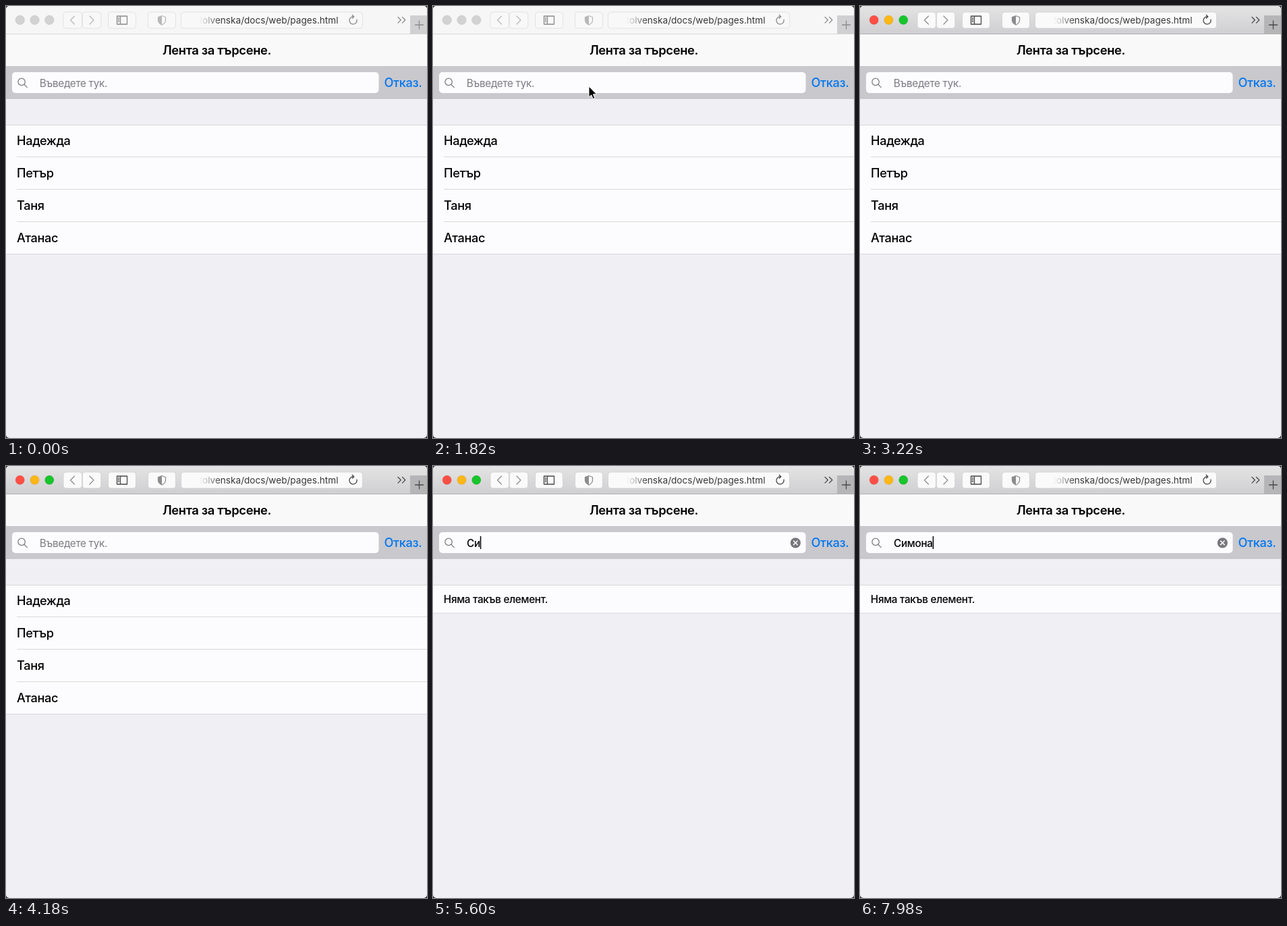
Animation of 624x640 px, one loop 8000 ms. Source, as an HTML page:

```html
<!DOCTYPE html>
<html lang="bg">
<head>
<meta charset="utf-8">
<title>Лента за търсене</title>
<style>
html, body { margin: 0; width: 100%; height: 100%; overflow: hidden; background: #343230; }
svg { display: block; width: 624px; height: 640px; }
text { font-family: Inter, "Noto Sans", sans-serif; font-size: 18.2px; font-weight: 450; letter-spacing: -.02em; fill: #000; white-space: pre; }
.title { font-size: 18.4px; font-weight: 600; text-anchor: middle; }
.small { font-size: 15.3px; }
.hint { font-weight: 400; fill: #7c7c80; }
.link { fill: #0076f0; }
.address { font-size: 13.6px; font-weight: 400; letter-spacing: 0; text-anchor: end; fill: #38383a; }
.icon { fill: none; stroke: #48484a; stroke-width: 1.3; stroke-linecap: round; stroke-linejoin: round; }
.faint { stroke: #8c8c8e; }
.search { stroke: #7e7e82; }
.button { fill: #fafafa; stroke: #cdcdce; stroke-width: .8; }
.edge { stroke: #d9d8dc; }
.lights circle { stroke: #0002; stroke-width: .6; }
.inactive .bar { fill: #f6f6f6; }
.inactive .button { fill: #f8f8f8; stroke: #dcdcdc; }
.inactive .icon { stroke: #8b8b8d; }
.inactive .faint { stroke: #b8b8ba; }
.inactive .half { fill: #b8b8ba; }
.inactive .lights circle { fill: #d2d2d3; stroke: #c3c3c4; }
.inactive .rule { stroke: #d8d8d9; }
.half { fill: #8c8c8e; }
.rule { stroke: #b2b2b4; }
</style>
</head>
<body>
<svg viewBox="0 0 624 640">
  <defs>
    <linearGradient id="metal" x2="0" y2="1">
      <stop stop-color="#e5e4e5"/><stop offset="1" stop-color="#cfced0"/>
    </linearGradient>
    <linearGradient id="fade" gradientUnits="userSpaceOnUse" x1="287" x2="318">
      <stop stop-color="#fff" stop-opacity="0"/><stop offset="1" stop-color="#fff"/>
    </linearGradient>
    <mask id="fadeMask"><rect x="287" y="8" width="210" height="28" fill="url(#fade)"/></mask>
    <clipPath id="window"><rect width="624" height="640" rx="5"/></clipPath>
  </defs>
  <rect width="624" height="640" fill="#343230"/>
  <g clip-path="url(#window)">
    <rect width="624" height="640" fill="#efeff4"/>

    <g id="chrome">
      <rect class="bar" width="624" height="41" fill="url(#metal)"/>
      <g class="lights">
        <circle cx="20.7" cy="20.7" r="6.7" fill="#ff4f44"/>
        <circle cx="42.5" cy="20.7" r="6.7" fill="#ffb714"/>
        <circle cx="64.3" cy="20.7" r="6.7" fill="#17c52c"/>
      </g>
      <rect class="button" x="85" y="9" width="27.5" height="24" rx="4"/>
      <rect class="button" x="113.3" y="9" width="27.5" height="24" rx="4"/>
      <rect class="button" x="151.5" y="9" width="41" height="24" rx="4"/>
      <rect class="button" x="210.5" y="9" width="41" height="24" rx="4"/>
      <rect class="button" x="259.5" y="9" width="269" height="24" rx="4"/>
      <path class="icon faint" d="M101.5 15l-6 6 6 6M124 15l6 6-6 6"/>
      <path class="icon" d="M164.5 15h15v12h-15zM169.5 15v12M166.300 18h1.4M166.300 20.5h1.4M166.300 23h1.4"/>
      <path class="icon faint" d="M231 14.5l5.5 2v4.5q0 4.5-5.5 7-5.5-2.5-5.5-7v-4.5z"/>
      <path class="half" d="M231 14.5v13.5q-5.5-2.5-5.5-7v-4.5z"/>
      <path class="icon" d="M520 20.2a5.6 5.6 0 1 1-4.8-4.4M513.2 13.2l2.6 2.6-2.6 2.6"/>
      <path class="icon" d="M581 16.5l4.3 4.3-4.3 4.3M587.5 16.5l4.3 4.3-4.3 4.3"/>
      <g mask="url(#fadeMask)"><text class="address" x="492.5" y="26.3">tolvenska/docs/web/pages.html</text></g>
      <path class="rule" d="M0 41.5H624"/>
      <rect id="newTab" x="599" y="14" width="25" height="27"/>
      <path class="icon" d="M612.5 22v12M606.5 28h12"/>
    </g>

    <rect y="42" width="624" height="47" fill="#f9f9fa"/>
    <text class="title" x="312.5" y="72.3">Лента за търсене.</text>

    <rect y="89" width="624" height="48" fill="#c8c8cd"/>
    <path d="M0 137H624" stroke="#bbbbc0"/>
    <rect x="9" y="98" width="543.5" height="31" rx="5" fill="#fcfcff"/>
    <path class="icon search" d="M28.3 112.4a5.2 5.2 0 1 1-10.4 0a5.2 5.2 0 1 1 10.4 0M27 116.3l4.3 4.3"/>
    <text class="small hint" id="hint" x="49.8" y="119.5">Въведете тук.</text>
    <text class="small" id="typed" x="50" y="119.5"></text>
    <rect id="caret" y="104" width="1.5" height="19"/>
    <g id="clear">
      <circle cx="537.3" cy="113.8" r="7.6" fill="#78787c"/>
      <path d="M534.5 111l5.6 5.6M540.1 111l-5.6 5.6" stroke="#fcfcff" stroke-width="1.5" stroke-linecap="round"/>
    </g>
    <text class="link" x="560.5" y="119.7">Отказ.</text>

    <g id="list"></g>
    <g id="empty">
      <rect y="176" width="624" height="42" fill="#fcfcff"/>
      <path class="edge" d="M0 176.5H624M0 218H624"/>
      <text class="small" x="15.8" y="203.3">Няма такъв елемент.</text>
    </g>
  </g>

  <path id="arrow" d="M0 0V16.2L3.7 12.8L6.2 18.5L8.8 17.4L6.4 11.8H11.5Z" stroke="#fff" stroke-linejoin="round"/>
  <g id="beam" fill="none" stroke-linecap="round">
    <path id="beamShape" d="M-3.5-8.5Q0-8.5 0-6.5V6.5Q0 8.5-3.5 8.5M3.5-8.5Q0-8.5 0-6.5M0 6.5Q0 8.5 3.5 8.5M-2 3H2" stroke-width="3" style="stroke: #fff"/>
    <path d="M-3.5-8.5Q0-8.5 0-6.5V6.5Q0 8.5-3.5 8.5M3.5-8.5Q0-8.5 0-6.5M0 6.5Q0 8.5 3.5 8.5M-2 3H2" stroke="#000" stroke-width="1.4"/>
  </g>
</svg>
<script>
const LOOP = 8000, ACTIVATE = 2000, FOCUS = 2250, HIDE_POINTER = 3000, BLINK = 560;
const WORD = 'Симона';
const KEYS = [4560, 5300, 5900, 6300, 6850, 7430];
const NAMES = ['Надежда', 'Петър', 'Таня', 'Атанас'];
const PATH = [[450, 150, 655], [1000, 212, 117], [1250, 212, 117], [1700, 231, 119]];

const el = id => document.getElementById(id);
const show = (id, on) => { el(id).style.display = on ? '' : 'none'; };

function pointerAt(t) {
  const next = PATH.findIndex(p => p[0] > t);
  if (next === 0) return PATH[0].slice(1);
  if (next < 0) return PATH[PATH.length - 1].slice(1);
  const [t0, x0, y0] = PATH[next - 1], [t1, x1, y1] = PATH[next];
  const k = (t - t0) / (t1 - t0), e = k * k * (3 - 2 * k);
  return [x0 + (x1 - x0) * e, y0 + (y1 - y0) * e];
}

function listMarkup(names) {
  if (!names.length) return '';
  const bottom = 176 + names.length * 48 - 0.5;
  const rows = names.map((name, i) => {
    const y = 176 + i * 48;
    const line = i ? `<path class="edge" d="M16 ${y - 0.5}H624"/>` : '';
    return `${line}<text x="16" y="${y + 30}">${name}</text>`;
  });
  return `<rect y="176" width="624" height="${bottom - 176}" fill="#fcfcff"/>
    <path class="edge" d="M0 176.5H624M0 ${bottom}H624"/>${rows.join('')}`;
}

let shown = null;
function setQuery(query) {
  if (query === shown) return;
  shown = query;
  const found = NAMES.filter(n => n.toLowerCase().includes(query.toLowerCase()));
  el('typed').textContent = query;
  el('list').innerHTML = listMarkup(found);
  show('empty', !found.length);
  show('hint', !query);
  show('clear', query);
}

function draw(t) {
  const active = t >= ACTIVATE;
  el('chrome').setAttribute('class', active ? '' : 'inactive');
  el('newTab').setAttribute('fill', active ? '#b5b5b7' : '#d0d0d2');

  const count = KEYS.filter(k => k <= t).length;
  setQuery(WORD.slice(0, count));

  const since = t - (count ? KEYS[count - 1] : FOCUS);
  show('caret', since >= 0 && Math.floor(since / BLINK) % 2 === 0);
  const width = count ? el('typed').getComputedTextLength() : 0;
  el('caret').setAttribute('x', 50 + width);

  const place = `translate(${pointerAt(t).join(' ')})`;
  show('arrow', t >= PATH[0][0] && !active);
  show('beam', active && t < HIDE_POINTER);
  el('arrow').setAttribute('transform', place);
  el('beam').setAttribute('transform', place);
}

const start = performance.now();
function tick() {
  draw((performance.now() - start) % LOOP);
  requestAnimationFrame(tick);
}
tick();
</script>
</body>
</html>
```
